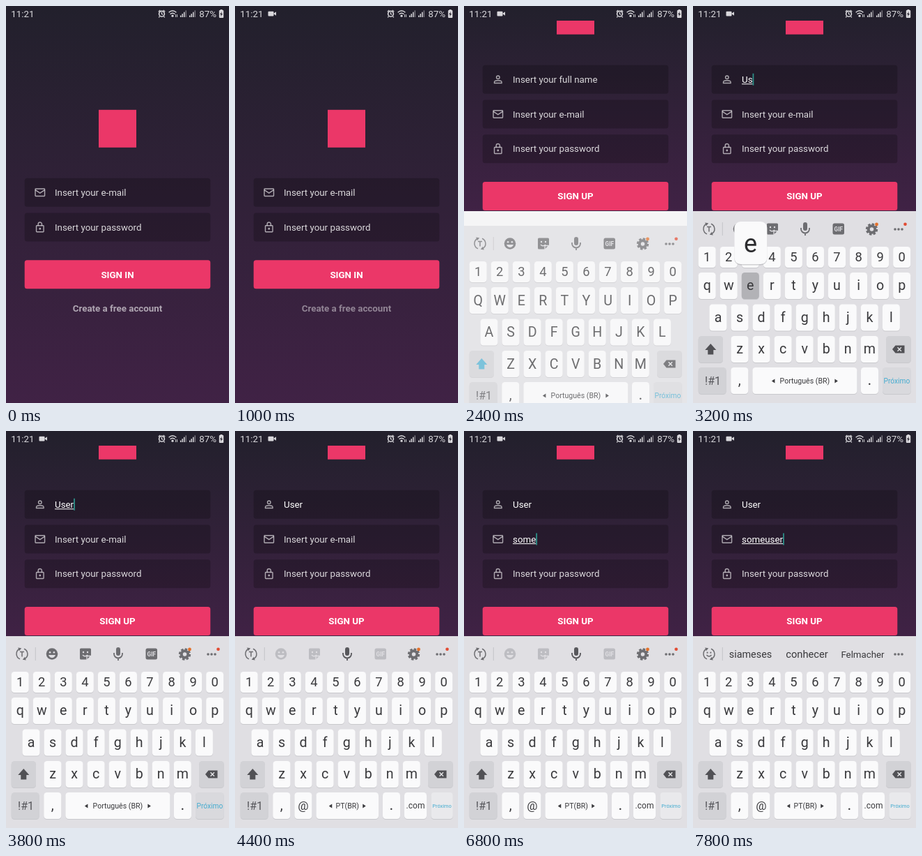
Write an HTML page that moves like this. It is 320 px wide and 569 px high and loops after 8000 ms.

```html
<!DOCTYPE html>
<html lang="en">
<head>
<meta charset="utf-8">
<title>Sign up</title>
<style>
html, body { margin: 0; width: 100%; height: 100%; overflow: hidden; background: #22202c; }
svg { display: block; width: 100vw; height: 100vh; }
text { font-family: Roboto, sans-serif; white-space: pre; }
</style>
</head>
<body>
<svg id="stage" viewBox="0 0 320 569" preserveAspectRatio="none"></svg>
<script>
const LOOP = 8000, STEP = 200;
const PINK = '#eb3768', INK = '#39393c', FORM_SIZE = 13.33;
const ROWS = ['1234567890', 'qwertyuiop', 'asdfghjkl', 'zxcvbnm'];
const ROW_X = [20.2, 20.2, 36, 67], ROW_Y = [345, 382, 427.5, 473], ROW_H = [30, 38, 38, 38];
const PITCH = 31.05;

// Each entry changes part of the state from its time on.
const timeline = [
  [0, { page: 'in', video: false, linkAlpha: 1, keyboard: '', caps: true, focus: -1,
        values: ['', '', ''], caret: false, composing: false, press: '', email: false, words: false }],
  [200, { video: true }],
  [800, { linkAlpha: .35 }],
  [1000, { linkAlpha: .75 }],
  [1200, { page: 'up', linkAlpha: 1 }],
  [2400, { keyboard: 'rising', focus: 0 }],
  [2600, { keyboard: 'open', caret: true }],
  [2800, { press: 'u' }],
  [3000, { values: ['U', '', ''], caps: false, composing: true, press: 's' }],
  [3200, { values: ['Us', '', ''], press: 'e' }],
  [3400, { values: ['Use', '', ''], press: '' }],
  [3600, { press: 'r' }],
  [3800, { values: ['User', '', ''], press: '' }],
  [4200, { focus: 1, composing: false }],
  [4400, { email: true, caret: false }],
  [4800, { caret: true }],
  [5400, { caret: false }],
  [5800, { caret: true, press: 's' }],
  [6000, { values: ['User', 's', ''], composing: true, press: 'o' }],
  [6200, { values: ['User', 'so', ''], press: '' }],
  [6400, { press: 'm' }],
  [6600, { values: ['User', 'som', ''], press: 'e' }],
  [6800, { values: ['User', 'some', ''], press: '' }],
  [7000, { press: 'u' }],
  [7200, { values: ['User', 'someu', ''], press: '' }],
  [7400, { values: ['User', 'someus', ''], press: 'e' }],
  [7600, { values: ['User', 'someuse', ''], press: 'r' }],
  [7800, { values: ['User', 'someuser', ''], press: '', words: true }]
];

const pen = document.createElement('canvas').getContext('2d');
const widthOf = s => {
  pen.font = `${FORM_SIZE}px Roboto, sans-serif`;
  return pen.measureText(s).width;
};
const box = (x, y, w, h, fill, r = 0, more = '') =>
  `<rect x="${x}" y="${y}" width="${w}" height="${h}" rx="${r}" fill="${fill}" ${more}/>`;
const text = (s, x, y, size, fill, more = '') =>
  `<text x="${x}" y="${y}" font-size="${size}" fill="${fill}" ${more}>${s}</text>`;
const mid = (s, x, y, size, fill, more = '') =>
  text(s, x, y, size, fill, `text-anchor="middle" ${more}`);
const path = (d, fill, more = '') => `<path d="${d}" fill="${fill}" ${more}/>`;
const line = (d, color, w) => path(d, 'none', `stroke="${color}" stroke-width="${w}"`);
const dot = (x, y, r, fill, more = '') => `<circle cx="${x}" cy="${y}" r="${r}" fill="${fill}" ${more}/>`;
const at = (x, y, inner, more = '') => `<g transform="translate(${x} ${y})" ${more}>${inner}</g>`;

const fieldIcons = {
  person: '<circle cx="12" cy="8" r="3"/><path d="M5 19v-2c0-2 4-3 7-3s7 1 7 3v2z"/>',
  mail: '<rect x="3" y="5" width="18" height="14" rx="1"/><path d="M3 7l9 6 9-6"/>',
  lock: '<rect x="5" y="9" width="14" height="12" rx="1"/><path d="M8.5 9V6a3.5 3.5 0 0 1 7 0v3"/><circle cx="12" cy="15" r="1"/>'
};
const fields = [['person', 'full name'], ['mail', 'e-mail'], ['lock', 'password']];

function field(index, y, s) {
  const [icon, label] = fields[index], value = s.values[index];
  const active = s.focus === index, end = 70 + widthOf(value);
  let out = box(26.7, y, 266.6, 41, '#000', 3.5, 'fill-opacity=".22"');
  out += `<g transform="translate(39.8 ${y + 11.5}) scale(.75)" fill="none" stroke="#fff" stroke-opacity=".62" stroke-width="1.9">${fieldIcons[icon]}</g>`;
  out += text(value || 'Insert your ' + label, 70, y + 25.2, FORM_SIZE, '#fff', value ? '' : 'fill-opacity=".83"');
  if (active && s.composing && value) out += box(70, y + 26.6, end - 70, 1, '#fff');
  if (active && s.caret) out += box(end, y + 12, 1.8, 17, '#2d8f88');
  return out;
}

function form(s) {
  const up = s.page === 'up', top = up ? 222 : 246.8;
  const list = up ? [0, 1, 2] : [1, 2];
  const buttonY = top + list.length * 49.75 + 18;
  return box(133, top - 98, 54, 54, PINK) +
    list.map((index, n) => field(index, top + n * 49.75, s)).join('') +
    box(26.7, buttonY, 266.6, 41, PINK, 3.5) +
    mid(up ? 'SIGN UP' : 'SIGN IN', 160, buttonY + 25.5, FORM_SIZE, '#fff', 'font-weight="700"') +
    mid(up ? 'Already have an account' : 'Create a free account', 160, buttonY + 73.3, FORM_SIZE, '#fff',
      `font-weight="700" fill-opacity="${.6 * s.linkAlpha}"`);
}

function statusBar(s) {
  const c = '#d9d8dc';
  const bars = x => [0, 1, 2, 3].map(i =>
    box(x + i * 2.5, 13.5 - i * 2.4, 1.5, 2.5 + i * 2.4, c, 0, i > 2 ? 'opacity=".45"' : '')).join('');
  let out = text('11:21', 7.3, 15.8, FORM_SIZE, c) + text('87%', 277.3, 15.8, FORM_SIZE, c);
  if (s.video) out += box(47.5, 7.8, 8, 6.6, c, 1) + path('M55 11l4-2.8v5.6z', c);
  out += dot(223.5, 11.3, 3.9, 'none', `stroke="${c}" stroke-width="1.6"`) +
    line('M223.5 9v2.5l1.7 1M218.8 8.2l2.5-2.3M228.2 8.2l-2.5-2.3M220.5 15l-1.3 1.4M226.5 15l1.3 1.4', c, 1.3);
  out += line('M233.6 9.2q5.4-4.8 10.8 0M235.6 11.6q3.4-2.8 6.8 0', c, 1.4) + dot(239, 14.2, 1.6, c) +
    line('M243.5 16v-4M245.5 12v4', c, .9);
  out += bars(250) + bars(263);
  return out + box(307.5, 5, 3, 2, c) + box(305.8, 6, 6.4, 11, c, 1) + path('M309.8 8l-2.8 4h1.7l-.6 3.2 2.8-4.2h-1.7z', '#24202c');
}

function rotateIcon(smile, c) {
  const face = smile
    ? dot(-2.4, -1.8, 1.1, c) + dot(2.4, -1.8, 1.1, c) + line('M-3.5 1.5Q0 5.5 3.5 1.5', c, 1.4)
    : line('M-3 -3H3M0 -3V4', c, 1.5);
  return line('M-3 7.3A8 8 0 0 1-4 -7M3 -7.3A8 8 0 0 1 4 7', c, 1.5) +
    path('M-5.8-9l5 .8-3.2 4zM5.8 9l-5-.8 3.2-4z', c) + face;
}

function toolbar(s) {
  const c = '#6d6d71', off = s.email ? '#bdbdc2' : c, bg = '#e0dfe3';
  let out = at(23, 319.5, rotateIcon(s.words, c)) + box(41.8, 310, 1, 19, '#c4c4c8');
  if (s.words) {
    out += mid('siameses', 82.5, 325.3, 14.4, INK) + mid('conhecer', 163.5, 325.3, 14.7, INK) +
      mid('Felmacher', 243.5, 325.3, 13.3, INK);
  } else {
    out += at(66, 319.5, dot(0, 0, 8.3, off) + dot(-2.9, -2.3, 1.3, bg) + dot(2.9, -2.3, 1.3, bg) +
      path('M-5 1.5H5Q3.5 5.5 0 5.5T-5 1.5', bg));
    out += at(114, 319.5, path('M-6.5-8H6.5Q8-8 8-6.5V2L2 8H-6.5Q-8 8-8 6.5V-6.5Q-8-8-6.5-8', off) +
      dot(-3, -2.5, 1.2, bg) + dot(3, -2.5, 1.2, bg) + line('M-4 1.5Q-1 5 3 1.5M2 8.5V3H8.5', bg, 1.3));
    out += at(161, 319.5, box(-3, -9.5, 6, 12, s.email ? '#58585c' : c, 3) +
      line('M-6-1.5V0A6 6 0 0 0 6 0V-1.5M0 6V9.5', s.email ? '#58585c' : c, 1.8));
    out += box(200.5, 311.5, 16.5, 16, off, 2.5) + mid('GIF', 208.8, 322.7, 8.2, bg, 'font-weight="700"');
    out += at(256.5, 320, dot(0, 0, 4.8, 'none', `stroke="${c}" stroke-width="4"`) +
      dot(0, 0, 7.4, 'none', `stroke="${c}" stroke-width="2.6" stroke-dasharray="3.5 2.31"`)) +
      dot(263.5, 313, 2.4, '#e2712c');
    out += dot(304.5, 312.8, 2.3, '#e24a32');
  }
  return out + [290, 295, 300].map(x => dot(x, 320, 1.8, c)).join('');
}

const key = (x, y, w, h, fill = '#fafafb') =>
  box(x, y + 1, w, h, '#c9c9cd', 4.5) + box(x, y, w, h, fill, 4.5);

function bottomRow(s) {
  const y = 518, h = 38, base = 542.8, grey = '#d2d2d6', blue = '#45acd0';
  const space = (x, w, label, half) => key(x, y, w, h) + mid(label, x + w / 2, 541, 10.6, INK) +
    path(`M${x + w / 2 - half} 534.5v6l-4.5-3zM${x + w / 2 + half} 534.5v6l4.5-3z`, INK);
  const sign = (x, label, size = 18) => key(x, y, 25, h) + mid(label, x + 12.5, base, size, INK);
  let out = key(7.7, y, 40, h, grey) + mid('!#1', 28.5, 543, 16, '#55555a') + sign(54.3, ',', 20);
  if (s.email) {
    out += sign(85.4, '@', 17) + space(116.5, 89.5, 'PT(BR)', 22) + sign(212, '.', 22) +
      key(243, y, 32, h) + mid('.com', 259, 541.2, 12, INK) +
      key(281.3, y, 31.5, h, '#e9e9ec') + mid('Próximo', 297, 540, 7.4, blue);
  } else {
    out += space(85.4, 150, 'Português (BR)', 43) + sign(241, '.', 22) +
      key(272, y, 40.8, h, '#d9d9dd') + mid('Próximo', 292.4, 541, 10.2, blue);
  }
  return out;
}

function keyboard(s) {
  const cased = c => s.caps ? c.toUpperCase() : c;
  let out = box(0, 294, 320, 275, '#e0dfe3') + toolbar(s), popup = '';
  ROWS.forEach((row, r) => [...row].forEach((c, n) => {
    const x = ROW_X[r] + n * PITCH, y = ROW_Y[r], h = ROW_H[r], held = c === s.press;
    out += key(x - 12.5, y, 25, h, held ? '#b2b2b6' : undefined);
    out += mid(cased(c), x, y + h / 2 + (r ? (s.caps ? 6.8 : 6.2) : 6.3), r ? 19.6 : 18.3, INK);
    if (held) popup = box(x - 23, y - 71.5, 47, 61, '#9d9da2', 9, 'opacity=".45"') +
      box(x - 23, y - 73, 47, 61, '#fafafb', 9) + mid(cased(c), x + .3, y - 29.5, 36, '#2c2c2f');
  }));
  out += key(7.7, 473, 35.3, 38, '#d2d2d6') +
    at(25.3, 492, path('M0-8L8 1H4V7.5H-4V1H-8Z', s.caps ? '#4fb0d2' : '#515155'));
  out += key(277, 473, 35.8, 38, '#d2d2d6') +
    at(295, 492, path('M-9 0L-4.5-5.5H8.5V5.5H-4.5Z', '#515155') + line('M-1.5-2.7l5.4 5.4m0-5.4l-5.4 5.4', '#e4e4e7', 1.4));
  return out + bottomRow(s) + popup;
}

function draw(s) {
  const open = s.keyboard !== '', rising = s.keyboard === 'rising', height = open ? 294 : 569;
  return `<defs><linearGradient id="sky" x1="0" y1="0" x2="0" y2="1">
      <stop stop-color="#22202c"/><stop offset="1" stop-color="#402245"/></linearGradient>
      <clipPath id="view"><rect y="21" width="320" height="${height - 21}"/></clipPath></defs>` +
    box(0, 0, 320, height, 'url(#sky)') +
    `<g clip-path="url(#view)">${at(0, open ? -137.3 : 0, form(s))}</g>` + statusBar(s) +
    (open ? box(0, 294, 320, 275, '#f5f5f6') + at(0, rising ? 21 : 0, keyboard(s), rising ? 'opacity=".72"' : '') : '');
}

const stage = document.getElementById('stage'), start = performance.now();
let shown = -1;
function tick() {
  const step = Math.floor((performance.now() - start) % LOOP / STEP);
  if (step !== shown) {
    shown = step;
    const past = timeline.filter(([from]) => from <= step * STEP).map(([, change]) => change);
    stage.innerHTML = draw(Object.assign({}, ...past));
  }
  requestAnimationFrame(tick);
}
tick();
</script>
</body>
</html>
```
